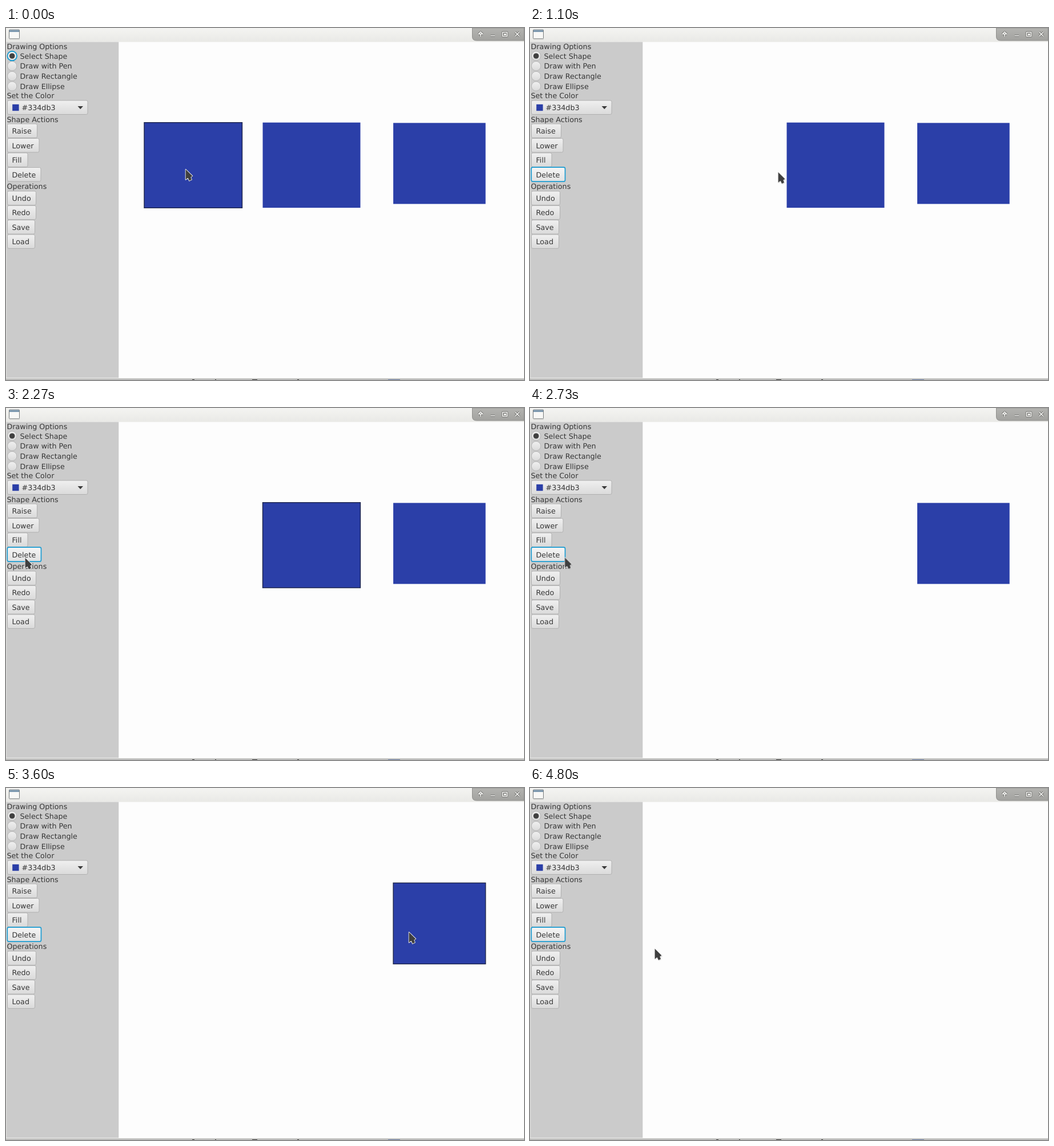
These frames come from a looping animation (907x617 px, 4.83 s). An HTML page:

```html
<!DOCTYPE html>
<html lang="en">
<head>
<meta charset="utf-8">
<title>Drawing window</title>
<style>
  html, body { margin: 0; width: 100%; height: 100%; overflow: hidden; background: #fdfdfd; }
  svg { display: block; width: 907px; height: 617px; }
  text { font: 12.7px "DejaVu Sans", sans-serif; fill: #363636; text-rendering: geometricPrecision; }
</style>
</head>
<body>
<svg id="stage" viewBox="0 0 907 617" xmlns="http://www.w3.org/2000/svg">
  <defs>
    <linearGradient id="title" x2="0" y2="1"><stop stop-color="#f4f4f2"/><stop offset="1" stop-color="#e9e9e6"/></linearGradient>
    <linearGradient id="tab" x2="0" y2="1"><stop stop-color="#b4b4b1"/><stop offset="1" stop-color="#a2a29f"/></linearGradient>
    <linearGradient id="button" x2="0" y2="1"><stop stop-color="#f0f0f0"/><stop offset="1" stop-color="#dadada"/></linearGradient>
    <linearGradient id="focused" x2="0" y2="1"><stop stop-color="#f5f5f5"/><stop offset="1" stop-color="#e2e2e2"/></linearGradient>
    <linearGradient id="pressed" x2="0" y2="1"><stop stop-color="#cfcfcf"/><stop offset="1" stop-color="#dedede"/></linearGradient>
  </defs>

  <rect width="907" height="617" fill="#fdfdfd"/>
  <rect width="907" height="24.5" fill="url(#title)"/>
  <rect y="24.5" width="197.3" height="589" fill="#cbcbcb"/>
  <rect y="24.5" width="1.2" height="589" fill="#dededc"/>
  <rect y="613.5" width="907" height="1.5" fill="#e6e6e4"/>
  <rect y="615" width="907" height="1.2" fill="#8b8b89"/>
  <path d="M326 616.5h4M366 616.5h2M431 616.5h9M510 616.5h3" stroke="#555"/>
  <path d="M669 616.5h21" stroke="#8fa3cc"/>

  <g id="windowIcon">
    <rect x="5.5" y="3" width="18" height="15.8" rx="1" fill="#f8f8f6" stroke="#777b7c"/>
    <rect x="6" y="3.5" width="17" height="3.5" fill="#7d99b0"/>
    <path d="M6 19.8h18" stroke="#c5c5c2"/>
  </g>
  <path d="M816.5 0V15Q816.5 22 823.5 22H907V0Z" fill="url(#tab)" stroke="#8e8e8b"/>
  <g fill="none" stroke="#6e6e6b" stroke-width="3.4" stroke-linejoin="round">
    <path id="controls" d="M831 15V10M827.5 10.5L831 7L834.5 10.5ZM848.5 13.5H856M869.5 7.5H877.5V14.5H869.5ZM872.5 10.5H875V12H872.5ZM891.5 7L899 14.5M899 7L891.5 14.5"/>
  </g>
  <use href="#controls" fill="none" stroke="#f8f8f6" stroke-width="1.6"/>

  <g id="panel"></g>
  <g id="canvas"></g>

  <g id="cursor">
    <path d="M1.5 2.5V20L5.5 17L8 22L12 20L10.5 16L14 14Z" fill="#000" opacity=".16"/>
    <path d="M.6 .8V18.8L4.6 15.8L7 20.8L11 18.8L9.3 14.6L12.4 12.4Z" fill="#3f3f3f" stroke="#f4f4f4" stroke-width="1.7" stroke-linejoin="round" paint-order="stroke"/>
  </g>
</svg>
<script>
const LOOP = 4830;
const NS = "http://www.w3.org/2000/svg";
const panel = document.getElementById("panel");
const canvas = document.getElementById("canvas");

function add(parent, tag, attrs, content = "") {
  const el = document.createElementNS(NS, tag);
  for (const [name, value] of Object.entries(attrs)) el.setAttribute(name, value);
  el.textContent = content;
  return parent.appendChild(el);
}

const label = (x, y, words) => add(panel, "text", { x, y }, words);

function play(el, frames) {
  el.animate(frames, { duration: LOOP, iterations: Infinity });
}

// Visible only between two times, with hard changes.
function show(el, from, to = LOOP) {
  const step = (time, opacity) => ({ offset: time / LOOP, opacity, easing: "step-end" });
  play(el, [step(0, from ? 0 : 1), step(from, 1), step(to, 0), step(LOOP, to < LOOP ? 0 : 1)]);
}

function box(x, y, width, height, fill, stroke = "#b0b0b0", line = 1) {
  return add(panel, "rect", { x, y, width, height, rx: 2.5, fill, stroke, "stroke-width": line });
}

// Headings
[["Drawing Options", 37], ["Set the Color", 123], ["Shape Actions", 164.5], ["Operations", 282]]
  .forEach(([words, y]) => label(1.5, y, words));

// Radio buttons
["Select Shape", "Draw with Pen", "Draw Rectangle", "Draw Ellipse"].forEach((words, i) => {
  const cx = 10.7, cy = 49 + i * 17.7;
  add(panel, "circle", { cx, cy, r: 8.2, fill: "url(#button)", stroke: "#b4b4b4" });
  if (i === 0) {
    const ring = add(panel, "circle", { cx, cy, r: 8.3, fill: "url(#focused)", stroke: "#1b9cd2", "stroke-width": 1.9 });
    show(ring, 0, 480);
    add(panel, "circle", { cx, cy, r: 4.8, fill: "#404040" });
  }
  label(24.5, cy + 4.6, words);
});

// Colour picker
box(2.5, 127, 140.5, 24.5, "url(#button)");
add(panel, "rect", { x: 11.2, y: 133.8, width: 11.4, height: 11.4, fill: "#2b3fa8" });
label(27.5, 144, "#334db3");
add(panel, "path", { d: "M125.5 137H135L130.3 142.3Z", fill: "#3a3a3a" });

// Push buttons
[["Raise", 168, 52], ["Lower", 193.5, 55.5], ["Fill", 219, 35.5], ["Delete", 244.5, 58.5],
 ["Undo", 286, 50], ["Redo", 311.3, 50], ["Save", 336.7, 48], ["Load", 362, 48]]
  .forEach(([words, y, width]) => {
    box(2.5, y, width, 24.4, "url(#button)");
    if (words === "Delete") {
      const focus = fill => box(2.3, y - .4, width + .7, 25, fill, "#1b9cd2", 1.7);
      show(focus("url(#focused)"), 480);
      [[480, 540], [2350, 2420], [4350, 4430]].forEach(([from, to]) => show(focus("url(#pressed)"), from, to));
    }
    label(10.5, y + 17, words);
  });

// Shapes: x, y, width, height, selected at, deleted at
[[242, 165.7, 171.5, 149.6, 0, 540],
 [449.5, 165.7, 171, 149.4, 1700, 2420],
 [678.1, 166.4, 161.6, 142, 3570, 4430]]
  .forEach(([x, y, width, height, selected, deleted]) => {
    const size = { x, y, width, height };
    show(add(canvas, "rect", { ...size, fill: "#2b3fa8" }), 0, deleted);
    show(add(canvas, "rect", { ...size, fill: "none", stroke: "#1e264c", "stroke-width": 1.4 }), selected, deleted);
  });

// Pointer path: time, x, y, easing towards the next point
const SPEED_UP = "cubic-bezier(.4,0,.75,.85)";
const SLOW_DOWN = "cubic-bezier(.2,.5,.5,1)";
const GLIDE = "cubic-bezier(.4,0,.35,1)";
const path = [
  [0, 314, 247], [70, 314, 247, GLIDE], [420, 33, 261],
  [770, 33, 262, SPEED_UP], [1100, 433, 252, SLOW_DOWN], [1470, 584, 269],
  [1970, 584, 269, GLIDE], [2265, 33, 262],
  [2670, 33, 262, SPEED_UP], [3030, 602, 248, SLOW_DOWN], [3430, 705, 252],
  [3770, 705, 252, GLIDE], [4130, 76, 266, SLOW_DOWN], [4260, 36, 261],
  [4560, 36, 261, SPEED_UP], [4800, 218, 281], [LOOP, 218, 281]
];
play(document.getElementById("cursor"), path.map(([time, x, y, easing = "linear"]) =>
  ({ offset: time / LOOP, transform: `translate(${x}px, ${y}px)`, easing })));
</script>
</body>
</html>
```
